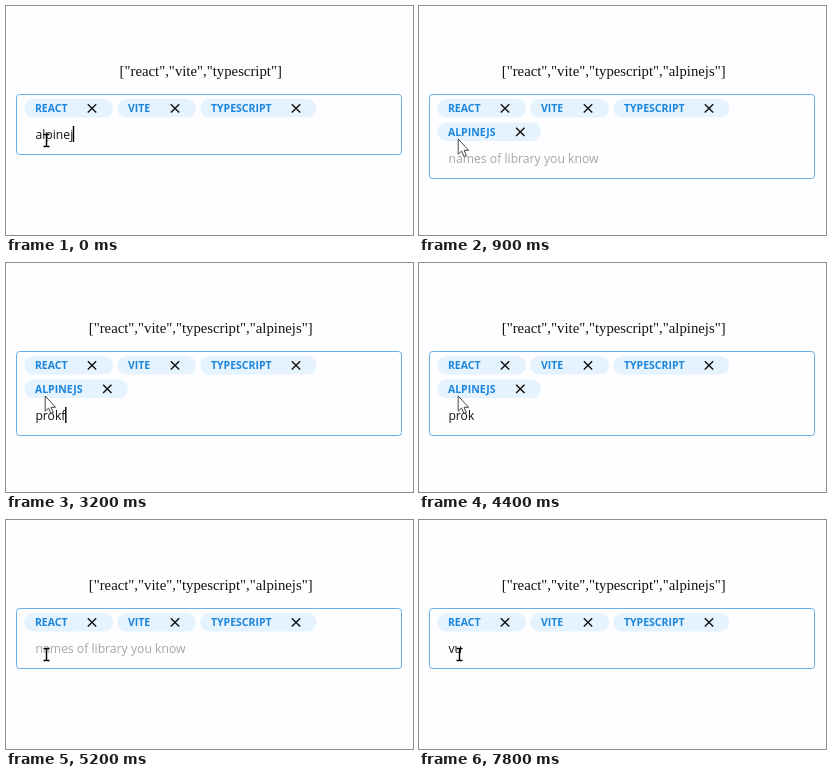
An HTML page with a canvas that plays this animation: 407x229 px, repeating every 8000 ms.

```html
<!DOCTYPE html>
<html lang="en">
<head>
<meta charset="utf-8">
<title>Tag input</title>
<style>
  html, body { margin: 0; height: 100%; overflow: hidden; background: #fefdff; }
  canvas { display: block; width: 407px; height: 229px; }
</style>
</head>
<body>
<canvas id="stage"></canvas>
<script>
const W = 407, H = 229, LOOP = 8000;
const ROW = 24;
const canvas = document.getElementById('stage');
const dpr = window.devicePixelRatio || 1;
canvas.width = W * dpr;
canvas.height = H * dpr;
const ctx = canvas.getContext('2d');

const SERIF = '14.75px "Liberation Serif", serif';
const INPUT = '12.2px "Open Sans", sans-serif';
const TAG = 'bold 10.5px "Open Sans", sans-serif';

// Label, left edge, width, close icon centre, row
const TAGS = [
  ['REACT', 18.3, 88.7, 86, 0],
  ['VITE', 111.3, 78.7, 169, 0],
  ['TYPESCRIPT', 194.3, 116, 290, 0],
  ['ALPINEJS', 18.3, 103.7, 101.3, 1],
];

// Start time, typed text, caret visible
const STEPS = [
  [0, 'alpinej', true],
  [500, 'alpinejs', true],
  [900, '', false],
  [1200, '', true],
  [1700, '', false],
  [2100, 'p', true],
  [2500, 'pro', true],
  [2900, 'prok', true],
  [3200, 'prokf', true],
  [3300, 'prokfs', true],
  [4100, 'prok', false],
  [4500, 'pr', true],
  [4800, '', false],
  [5300, '', true],
  [5700, '', false],
  [6100, '', true],
  [6500, '', false],
  [6900, '', true],
  [7100, 'v', true],
  [7300, 'vu', true],
  [7700, 'vu', false],
];

function text(string, x, y, font, color, align = 'left') {
  ctx.font = font;
  ctx.fillStyle = color;
  ctx.textAlign = align;
  ctx.fillText(string, x, y);
}

function stroke(path, color, width) {
  ctx.strokeStyle = color;
  ctx.lineWidth = width;
  ctx.stroke(new Path2D(path));
}

function drawTag([label, x, width, closeX, row]) {
  const y = 93 + row * 23.5;
  ctx.fillStyle = '#e5f3ff';
  ctx.beginPath();
  ctx.roundRect(x, y, width, 18.6, 9.3);
  ctx.fill();
  text(label, x + 10.6, y + 13, TAG, '#1c86dc');
  const cy = y + 9.4;
  stroke(`M${closeX - 4.2} ${cy - 4.2}l8.4 8.4m0 -8.4l-8.4 8.4`, '#111', 1.4);
}

function drawInput(typed, caret, shift) {
  const x = 29.4, y = 133.2 + shift;
  text(typed || 'names of library you know', x, y, INPUT, typed ? '#141414' : '#a4a6aa');
  if (!caret) return;
  ctx.fillStyle = '#000';
  ctx.fillRect(x + ctx.measureText(typed).width - (typed ? 0.4 : 0), y - 13.2, 1.4, 16);
}

function drawPointer(overTag) {
  if (overTag) {
    const arrow = 'M39.2 133v15.2l3.4 -3.1l2.3 5.3l2.4 -1l-2.3 -5.1h4.6z';
    ctx.fillStyle = '#fff';
    ctx.fill(new Path2D(arrow));
    stroke(arrow, '#333', 0.9);
  } else {
    stroke('M37.5 128.5h2.2l0.8 0.8l0.8 -0.8h2.2M40.5 129v11M37.5 140.5h2.2l0.8 -0.8l0.8 0.8h2.2', '#000', 1.4);
  }
}

function draw(time) {
  const [, typed, caret] = STEPS.findLast(([start]) => start <= time);
  const hasFourthTag = time >= 900 && time < 4800;
  const shift = hasFourthTag ? ROW : 0;
  const names = TAGS.slice(0, time < 900 ? 3 : 4).map(([label]) => label.toLowerCase());

  ctx.setTransform(dpr, 0, 0, dpr, 0, 0);
  ctx.fillStyle = '#fefdff';
  ctx.fillRect(0, 0, W, H);
  text(JSON.stringify(names), 194.7, 70, SERIF, '#111', 'center');

  ctx.strokeStyle = '#68aee8';
  ctx.lineWidth = 1;
  ctx.beginPath();
  ctx.roundRect(10.5, 88.5, 385, 60 + shift, 3);
  ctx.stroke();

  TAGS.slice(0, hasFourthTag ? 4 : 3).forEach(drawTag);
  drawInput(typed, caret, shift);
  drawPointer(hasFourthTag);
}

const begin = performance.now();
function tick() {
  draw((performance.now() - begin) % LOOP);
  requestAnimationFrame(tick);
}
tick();
</script>
</body>
</html>
```
